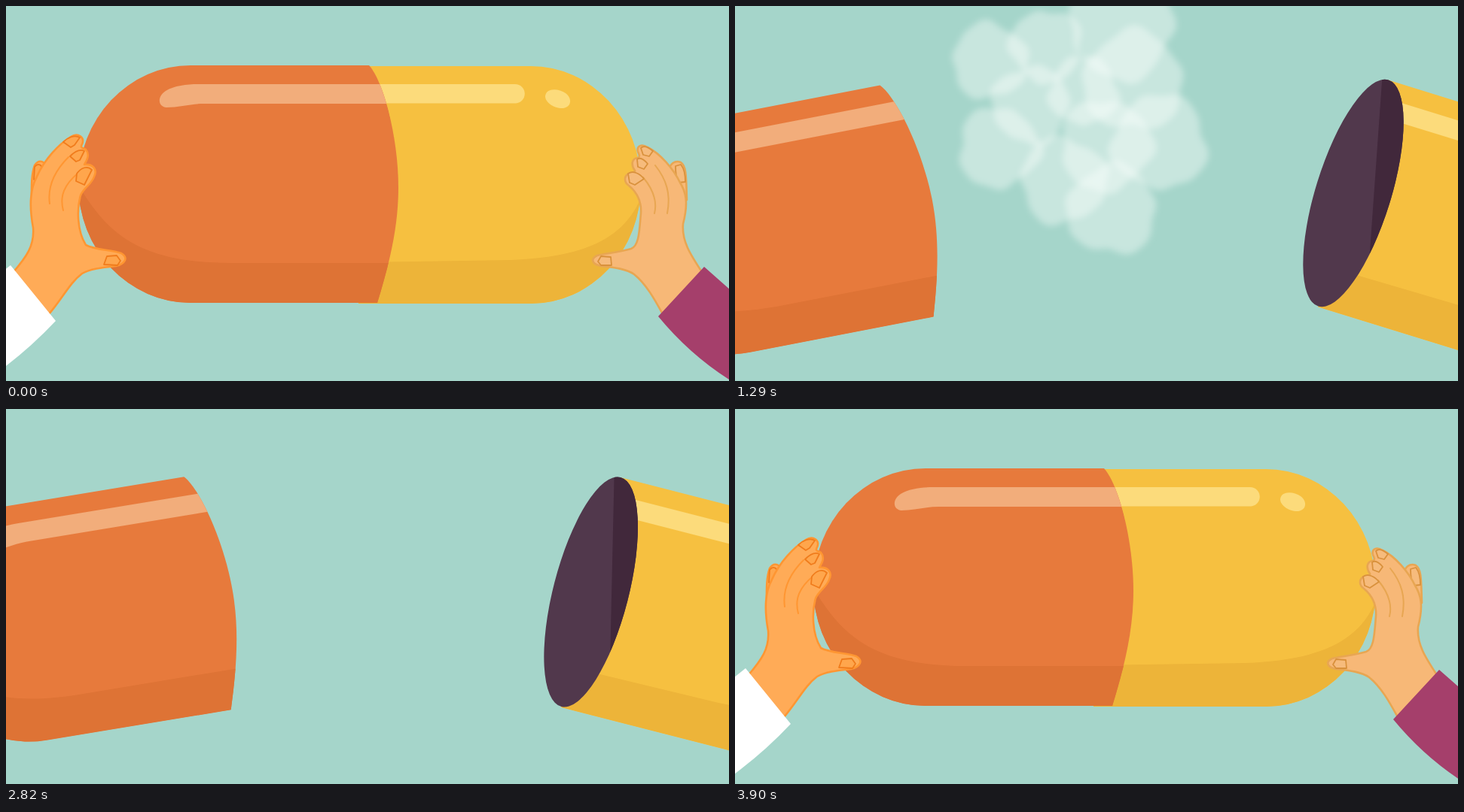
These frames come from a looping animation (960x499 px, 4200 ms). An HTML page:

```html
<!DOCTYPE html>
<html lang="en">
<head>
<meta charset="utf-8">
<title>Capsule</title>
<style>
  html, body { margin: 0; width: 100%; height: 100%; overflow: hidden; background: #a5d5ca; }
  svg { display: block; width: 100vw; height: 100vh; }
  .hand path { stroke-width: 2.6; stroke-linecap: round; stroke-linejoin: round; }
  .left path { fill: #ffab57; stroke: #ff9632; }
  .right path { fill: #f7b877; stroke: #e8a652; }
  .hand .crease { fill: none; stroke-width: 2; }
  .hand .nail { stroke-width: 1.8; }
  .left .nail { fill: #ffa64c; stroke: #f07c1c; }
  .right .nail { fill: #f6bb7c; stroke: #d9913c; }
</style>
</head>
<body>
<svg viewBox="0 0 960 499">
  <defs>
    <path id="orangeBody" d="M482 79C500 98 521 172 521 242C521 300 506 352 493 395H245A149 158 0 0 1 245 79Z"/>
    <path id="yellowBody" d="M468 80H697A146 158 0 0 1 697 396H468Z"/>
    <ellipse id="opening" cx="468" cy="237.5" rx="50" ry="157.5"/>
    <clipPath id="orangeClip"><use href="#orangeBody"/></clipPath>
    <clipPath id="yellowClip"><use href="#yellowBody"/></clipPath>
    <clipPath id="openingClip"><use href="#opening"/></clipPath>
    <filter id="soft" filterUnits="userSpaceOnUse" x="0" y="-200" width="960" height="800">
      <feGaussianBlur stdDeviation="4"/>
    </filter>
  </defs>
  <rect width="960" height="499" fill="#a5d5ca"/>
  <g id="smoke" fill="#f8fcfb" filter="url(#soft)"></g>

  <g id="yellow">
    <use href="#yellowBody" fill="#f6c040"/>
    <g clip-path="url(#yellowClip)">
      <path fill="#edb439" d="M468 341L670 338C765 334 822 312 845 250V400H468Z"/>
    </g>
    <path fill="#fcdb7b" d="M480 104H676A12.7 12.7 0 0 1 676 129.5H480Z"/>
    <path fill="#fcdb7b" d="M716 120C717 109 733 109 743 116C752 123 751 134 740 136C729 137 716 129 716 120Z"/>
    <use href="#opening" fill="#51384c"/>
    <g clip-path="url(#openingClip)">
      <path fill="#41283b" d="M458 74L515 318L560 318V74Z"/>
    </g>
    <g class="hand right">
      <path d="M880 222C880 209 889 205 896 208C904 213 903 230 904 258L886 265Z"/>
      <path class="nail" d="M889 213C889 221 890 229 893 235L902 234C902 225 901 217 896 211Z"/>
      <path d="M924 354C909 331 897 313 899 290C904 270 906 252 895 235C886 216 868 196 852 188C844 183 837 186 839 194
        C841 198 842 201 839 202C830 203 830 212 835 219C836 221 833 221 829 222C820 225 820 234 827 239
        C838 248 844 260 843 276C841 297 841 319 830 323C813 328 798 329 785 332C775 337 779 344 790 346
        C809 348 824 350 834 357C850 370 861 390 872 410Z"/>
      <path class="crease" d="M862 212C877 231 883 250 878 276M846 228C860 245 865 260 861 276"/>
      <path class="nail" d="M843 189L846 198L854 200L859 193C853 188 847 185 843 189Z
        M838 204L839 214L847 217L852 210C847 204 842 201 838 204Z
        M826 223L828 235L835 238L847 230C841 222 832 219 826 223Z
        M786 340L790 333L803 334L804 345L790 345Z"/>
    </g>
    <path fill="#a53f6b" d="M927 347L1100 500L1060 590L960 497Q907 463 866 413Z"/>
  </g>

  <g id="orange">
    <use href="#orangeBody" fill="#e77a3c"/>
    <g clip-path="url(#orangeClip)">
      <path fill="#de7335" d="M90 228C130 298 170 342 300 342H530V400H90Z"/>
      <path fill="#f2ad7b" d="M212 113C223 106 240 104 255 104H530V130H262C246 130 229 135 213 135C202 134 200 121 212 113Z"/>
    </g>
    <g class="hand left">
      <g id="pinky">
        <path d="M34 266C34 244 33 226 38 212C44 203 54 206 55 220L52 266Z"/>
        <path class="nail" d="M37 231L38 214C43 208 48 212 48 217L46 230Z"/>
      </g>
      <path d="M9 355C27 334 38 319 36 295C31 268 32 243 41 227C51 204 70 184 86 174C96 168 105 175 101 184
        C98 189 102 189 106 191C112 198 107 206 104 211C115 210 122 217 117 227C114 237 103 242 99 252
        C94 269 94 299 106 318C119 325 138 324 153 329C163 335 158 343 146 346C127 348 111 350 101 356
        C85 368 75 389 57 410Z"/>
      <path class="crease" d="M83 201C64 220 55 241 58 263M96 222C77 238 71 253 76 272"/>
      <path class="nail" d="M76 181L86 188L91 185L98 175C91 171 82 175 76 181Z
        M85 200L93 207L98 205L104 193C98 190 91 194 85 200Z
        M94 223L93 233L104 238L114 218C108 212 100 215 94 223Z
        M130 344L134 333L147 332L152 339L148 345Z"/>
    </g>
    <path fill="#fff" d="M6 345L66 419Q35 452 0 479L-140 590L-160 478Z"/>
  </g>
</svg>
<script>
const LOOP = 4200, STEP = 30, LAST = 3900;
const PUFF_COUNT = 11, BURST = 330, SMOKE_END = 2190;
const GOLDEN_ANGLE = Math.PI * (3 - Math.sqrt(5));

const byId = id => document.getElementById(id);
const ramp = (t, from, to) => Math.min(1, Math.max(0, (t - from) / (to - from)));
const smooth = u => u * u * (3 - 2 * u);
const mix = (a, b, u) => a + (b - a) * u;
const settle = (age, time) => 1 - Math.exp(-age / time);

const smoke = byId("smoke");
const puffs = Array.from({ length: PUFF_COUNT }, () =>
  smoke.appendChild(document.createElementNS("http://www.w3.org/2000/svg", "path")));

// A circle with a lumpy edge that differs by seed.
function cloudPath(x, y, radius, seed) {
  const points = Array.from({ length: 40 }, (_, n) => {
    const a = n * Math.PI / 20;
    const r = radius * (1 + .06 * Math.sin(3 * a + seed * 2) + .05 * Math.sin(5 * a + seed) + .025 * Math.sin(9 * a + seed));
    return `${(x + r * Math.cos(a)).toFixed(1)} ${(y + r * Math.sin(a)).toFixed(1)}`;
  });
  return `M${points.join("L")}Z`;
}

// Puffs sit on a sunflower spiral that spreads from the burst and rises.
function drawSmoke(t) {
  const age = t - BURST;
  const visible = age > 0 && t < SMOKE_END;
  smoke.style.display = visible ? "" : "none";
  if (!visible) return;

  const spread = 150 * settle(age, 300);
  const centerY = 239 - .177 * Math.max(0, t - 750);
  const fade = mix(.42, .16, ramp(t, 1350, 2050)) * ramp(age, 0, 170) * ramp(t, SMOKE_END, 2100);
  puffs.forEach((puff, i) => {
    const angle = 4.8 + i * GOLDEN_ANGLE;
    const distance = spread * Math.sqrt((i + .5) / PUFF_COUNT);
    const radius = (46 + 24 * (i * .618 % 1)) * settle(age, 150);
    puff.setAttribute("d", cloudPath(460 + distance * Math.cos(angle), centerY + distance * Math.sin(angle), radius, i));
    puff.setAttribute("opacity", fade);
  });
}

function place(id, x, y, angle, cx, cy) {
  byId(id).setAttribute("transform", `translate(${x} ${y}) rotate(${angle} ${cx} ${cy})`);
}

function draw(t) {
  const closing = t > 2400;
  const openness = (from, to) => smooth(closing ? 1 - ramp(t, from, to) : ramp(t, 180, 690));
  const left = openness(2632, 3408);
  const right = openness(2654, 3371);
  const base = closing ? 8 : 0;
  const tug = t < 180 ? -5 * Math.sin(t / 90 * Math.PI) : 0;
  const drift = 3 * ramp(t, 1300, 2100);
  const arc = (open, lift, end) => (end + lift) * open * open - lift * open;

  place("orange", tug + mix(base, -259.5, left), arc(left, 64, 22.5), -11 * left, 487.5, 237);
  place("yellow", tug + mix(base, 353 + drift, right), arc(right, 22, 11.5), 17.2 * right ** 1.2, 468, 237.5);
  byId("pinky").setAttribute("transform", `rotate(${-15 * Math.min(1, left * 12)} 42 270)`);
  drawSmoke(t);
}

function tick() {
  const t = performance.now() % LOOP;
  draw(Math.min(LAST, Math.floor(t / STEP) * STEP));
  requestAnimationFrame(tick);
}
tick();
</script>
</body>
</html>
```
